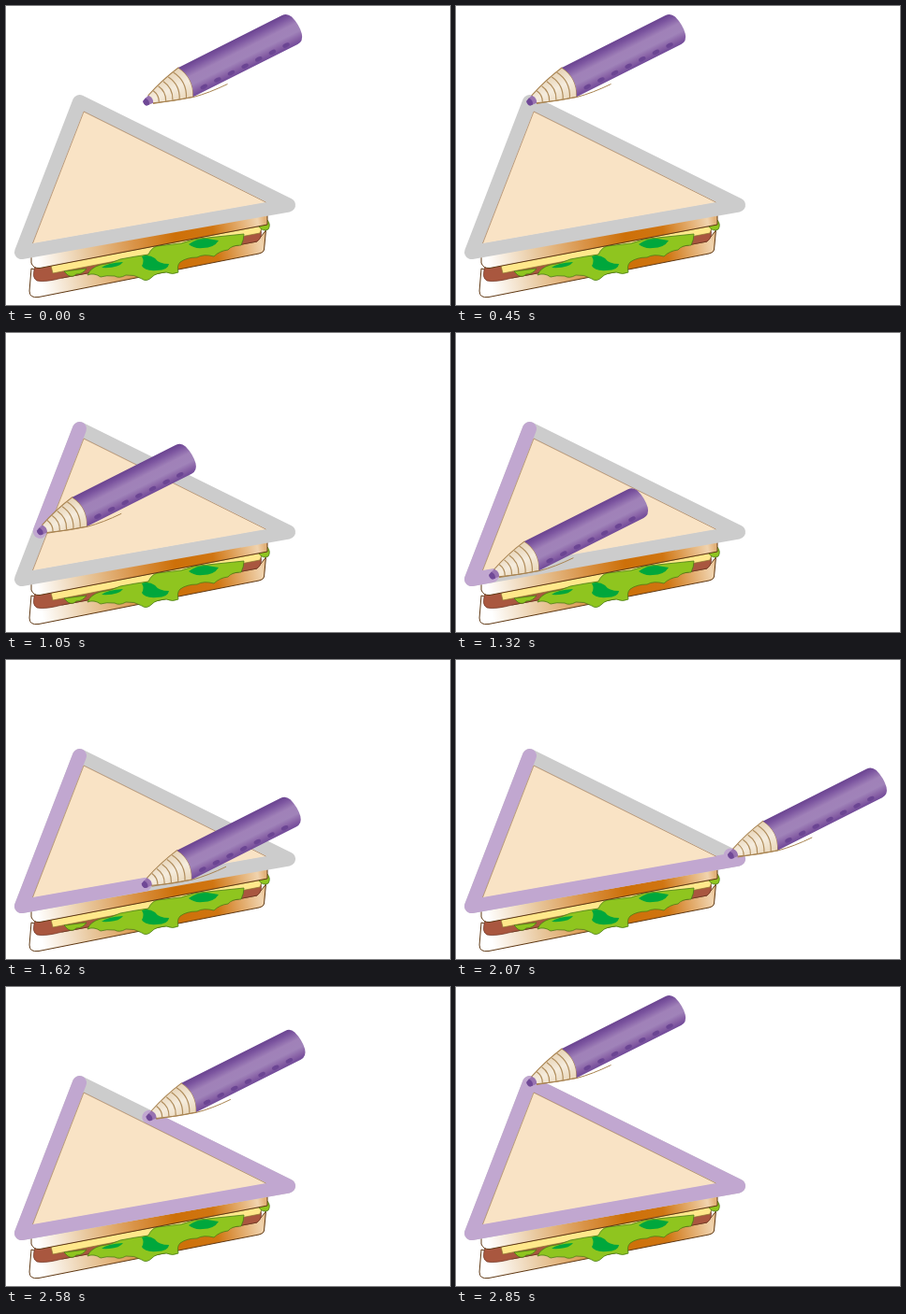
These frames come from a looping animation (474 px wide and 320 px high, 3 s). An HTML page:

```html
<!DOCTYPE html>
<html lang="en">
<head>
<meta charset="utf-8">
<title>Tracing a sandwich</title>
<style>
html, body { margin: 0; width: 100%; height: 100%; overflow: hidden; background: #fff; }
svg { display: block; width: 474px; height: 320px; }
</style>
</head>
<body>
<svg viewBox="0 0 474 320">
  <defs>
    <linearGradient id="crust" gradientUnits="userSpaceOnUse" x1="26" y1="290" x2="279" y2="245">
      <stop offset="0.04" stop-color="#fff"/>
      <stop offset="0.25" stop-color="#e8c79c"/>
      <stop offset="0.45" stop-color="#d99347"/>
      <stop offset="0.62" stop-color="#cd7009"/>
      <stop offset="0.78" stop-color="#d07511"/>
      <stop offset="0.97" stop-color="#f0d3ae"/>
      <stop offset="1" stop-color="#e3b27a"/>
    </linearGradient>
    <linearGradient id="barrel" x1="0" y1="0" x2="0" y2="1">
      <stop offset="0" stop-color="#6a4490"/>
      <stop offset="0.14" stop-color="#7b549f"/>
      <stop offset="0.4" stop-color="#a081b8"/>
      <stop offset="0.65" stop-color="#a083b9"/>
      <stop offset="0.85" stop-color="#8760a5"/>
      <stop offset="1" stop-color="#714a99"/>
    </linearGradient>
    <linearGradient id="wood" x1="0" y1="0" x2="0" y2="1">
      <stop offset="0" stop-color="#e6d2b4"/>
      <stop offset="0.5" stop-color="#f5ecdd"/>
      <stop offset="1" stop-color="#e9d6b8"/>
    </linearGradient>
  </defs>

  <g stroke-linejoin="round">
    <path fill="url(#crust)" stroke="#5f3813" d="M27 281L25 305Q25 313 35 311.500L270 265Q275 264 275.500 261L277.500 240L268 252L60 291Z"/>
    <path fill="#a9573f" stroke="#6d3322" stroke-width=".7" d="M31 279L272 239Q274 248 268 252L60 291Q42 296 33 294Q27 291 31 279Z"/>
    <path fill="#ffe88b" stroke="#8b7430" stroke-width=".7" d="M48 278L274 235L271 243L50 286Z"/>
    <g fill="#8fc51f" stroke="#4b7d17" stroke-width=".8">
      <path d="M62 284L86 281Q82 287 75 287Q71 291 66 288Z"/>
      <path d="M270 236L279 229Q283 234 280 239Q274 242 270 236Z"/>
      <path d="M152 266Q155 259 161 257L187 254Q202 248 215 248L254 244Q254 250 251 256Q241 256 237 261Q228 262 222 268Q211 265 204 269Q193 269 186 274Q182 278 184 285Q178 288 171 285Q159 286 156 290Q150 296 145 292Q137 287 128 288Q121 292 116 289Q107 288 101 290Q94 285 87 288Q90 280 101 277Q112 276 122 271Q137 268 152 266Z"/>
    </g>
    <g fill="#00a73c">
      <path d="M145 268Q152 265 159 270Q163 276 174 276Q173 283 161 283Q148 284 145 278Q148 273 145 268Z"/>
      <path d="M195 255Q204 248 215 249L227 251Q222 259 210 259Q201 260 195 255Z"/>
      <path d="M102 280Q108 275 125 274Q120 281 102 280Z"/>
    </g>
    <path fill="url(#crust)" stroke="#5f3813" d="M27 264L279 222V234L36 280.500Q29 281 27 275Z"/>
  </g>

  <g fill="none" stroke-width="15" stroke-linecap="round" stroke-linejoin="round">
    <path id="border" stroke="#ccc"/>
    <path id="trail" stroke="#c1a7d0"/>
  </g>
  <path fill="#f9e3c5" d="M83 113L277.500 210L28.500 254Z"/>
  <path fill="none" stroke="#9c744f" stroke-width=".7" d="M28.500 254L83 113L277.500 210"/>

  <g id="pencil">
    <g transform="translate(113 66) rotate(-26.8)">
      <path fill="url(#wood)" stroke="#a88350" d="M0 0Q-22 4 -42 12L-41 21.500Q-20 30 0 35Q10 17 0 0Z"/>
      <g id="rings" fill="none" stroke="#b08d5c" stroke-width="1.200"></g>
      <path fill="#9873b1" d="M-42 12Q-38 17 -41 21.500L-48 21Q-51 20 -50 15Q-47 13 -42 12Z"/>
      <path fill="#6f4896" d="M-46 13.300Q-43 17 -45.500 21.300L-48 21Q-51 20 -50 15Z"/>
      <path fill="url(#barrel)" d="M0 0H124Q130 0 132.500 6Q136 17 134 27Q132 35 125 35H0Q10 17 0 0Z"/>
      <g id="dots" fill="#6b4593"></g>
    </g>
    <path fill="none" stroke="#a88350" d="M86 104.500L129 97.500Q146 93 165.500 83.500"/>
  </g>
</svg>

<script>
const LOOP = 3000, STEP = 30;
const REST = 15, DRAW = 20;
const SLIDE = 71;
const corners = [[78.5, 102.5], [16.5, 263.5], [301.5, 213], [78.5, 102.5]];
const edgeSteps = [22, 26, 27];

const byId = id => document.getElementById(id);
const toPath = points => 'M' + points.map(p => p.join(' ')).join('L');

function add(parent, tag, attrs) {
  const node = document.createElementNS('http://www.w3.org/2000/svg', tag);
  for (const key in attrs) node.setAttribute(key, attrs[key]);
  parent.append(node);
}

for (let i = 1; i <= 5; i++) {
  const x = -7 * i, top = 2 * i, bottom = 35 - 2.3 * i;
  add(byId('rings'), 'path', { d: `M${x} ${top}Q${x + 10 - 1.3 * i} 17 ${x} ${bottom}` });
}
for (let i = 0; i < 7; i++) {
  add(byId('dots'), 'ellipse', { cx: 15.1 + 16.4 * i, cy: 30.5, rx: 4, ry: 2.2 });
}
byId('border').setAttribute('d', toPath(corners.slice(0, 3)) + 'Z');

// Corners passed so far, followed by the current tip position.
function tracedPoints(steps) {
  const points = [corners[0]];
  for (let i = 0; i < edgeSteps.length && steps > 0; i++) {
    const part = Math.min(steps / edgeSteps[i], 1);
    const [from, to] = [corners[i], corners[i + 1]];
    points.push(from.map((v, axis) => v + (to[axis] - v) * part));
    steps -= edgeSteps[i];
  }
  return points;
}

function render(time) {
  const step = Math.floor((time % LOOP) / STEP);
  const points = tracedPoints(step - DRAW);
  const tip = points[points.length - 1];
  const slide = SLIDE * Math.max(0, 1 - step / REST);
  const dx = tip[0] - corners[0][0] + slide;
  const dy = tip[1] - corners[0][1];
  byId('pencil').setAttribute('transform', `translate(${dx} ${dy})`);
  byId('trail').setAttribute('d', points.length > 1 ? toPath(points) : '');
}

const start = performance.now();
function tick() {
  render(performance.now() - start);
  requestAnimationFrame(tick);
}
tick();
</script>
</body>
</html>
```
